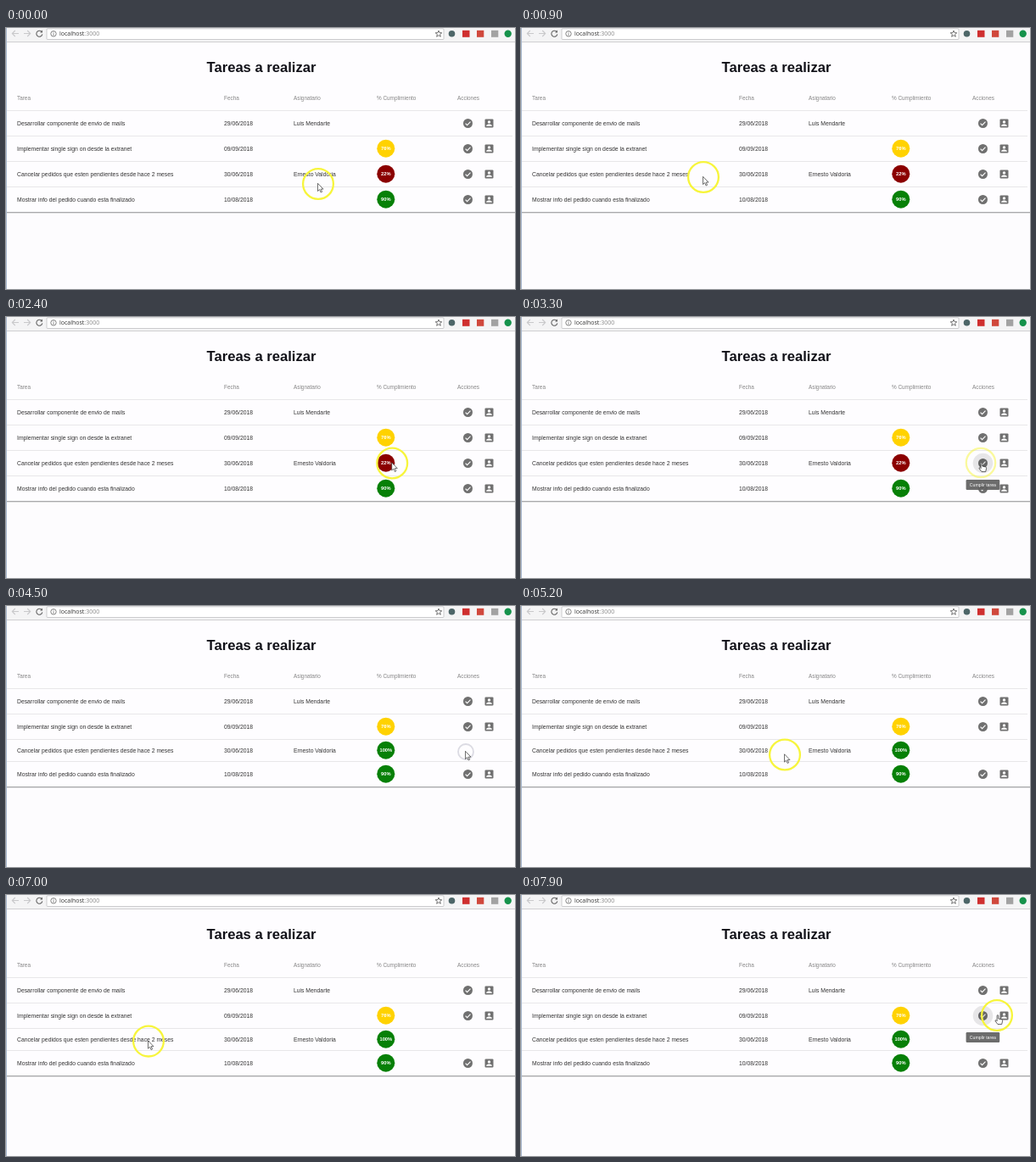
Write an HTML page that moves like this. It is 600 px wide and 308 px high and loops after 8 s.

```html
<!DOCTYPE html>
<html lang="es">
<head>
<meta charset="utf-8">
<title>Tareas a realizar</title>
<style>
  html, body { margin: 0; width: 100%; height: 100%; overflow: hidden; background: #fdfcfe; }
  svg { display: block; width: 100vw; height: 100vh; }
  text { font-family: "Liberation Sans", Arial, sans-serif; font-size: 6.8px; fill: #333; white-space: pre; }
  .title { font-size: 16.6px; font-weight: bold; fill: #111118; text-anchor: middle; }
  .head { font-size: 6.38px; fill: #868686; }
  .pct { font-size: 5.75px; font-weight: bold; fill: #fff; text-anchor: middle; }
  .url { font-family: "Open Sans", "Noto Sans", sans-serif; font-size: 7px; fill: #333; }
  .tip text { font-size: 5.2px; fill: #fff; text-anchor: middle; }
  .rule { stroke: #e8e7e9; }
</style>
</head>
<body>
<svg viewBox="0 0 600 308" preserveAspectRatio="none">
  <defs>
    <g id="check">
      <circle r="5.5" fill="#707070"/>
      <path d="M-2.9 .2L-.9 2.2L3 -1.8" fill="none" stroke="#fff" stroke-width="1.1"/>
    </g>
    <g id="person">
      <rect x="-5" y="-5" width="10" height="10" rx="1.1" fill="#707070"/>
      <circle cy="-1.6" r="1.7" fill="#fff"/>
      <path d="M-3.4 3.3v-.6C-3.4 1.6 -1.1 1 0 1S3.4 1.6 3.4 2.7v.6z" fill="#fff"/>
    </g>
  </defs>

  <rect width="600" height="308" fill="#fdfcfe"/>
  <g id="panel"></g>

  <rect width="600" height="16" fill="#f4f4f5"/>
  <path d="M0 16.5H600" stroke="#cfcfd1"/>
  <rect x="48" y=".8" width="468" height="12.7" rx="1" fill="#fff" stroke="#b8b8bb" stroke-width=".7"/>
  <g fill="none" stroke="#c9c9cb" stroke-width="1.1">
    <path d="M15 6.5H7.5M10.8 3L7.3 6.5L10.8 10"/>
    <path d="M21 6.5H28.5M25.2 3L28.7 6.5L25.2 10"/>
    <path d="M41.8 4.2A3.5 3.5 0 1 0 42.8 7.4" stroke="#666"/>
    <path d="M43 2.6V5.6H40z" fill="#666" stroke="none"/>
    <circle cx="56" cy="6.8" r="3.2" stroke="#666" stroke-width=".8"/>
    <path d="M56 6.3V8.7M56 4.7V5.5" stroke="#666" stroke-width=".8"/>
  </g>
  <text class="url" x="63" y="9.3">localhost<tspan fill="#888">:3000</tspan></text>
  <path id="star" fill="none" stroke="#555" stroke-width=".8"/>
  <circle cx="525.5" cy="6.8" r="3.8" fill="#4d6668"/>
  <rect x="538" y="2.8" width="8.5" height="8" fill="#cf2f2f"/>
  <rect x="555" y="2.8" width="8.3" height="8" fill="#d0483c"/>
  <rect x="572" y="2.8" width="8.3" height="8" fill="#a2a2a2"/>
  <circle cx="591.7" cy="6.8" r="4.2" fill="#15924b"/>
  <path d="M.5 0V308" stroke="#a9b9cf"/>

  <g id="halo"><circle r="11.8" fill="#000" fill-opacity=".09"/></g>
  <g id="tip" class="tip">
    <rect x="-19.8" y="-6" width="39.6" height="12" rx="1.2" fill="#616161" fill-opacity=".93"/>
    <text y="1.8">Cumplir tarea</text>
  </g>
  <g id="cursor">
    <circle id="ring" fill="none"/>
    <path id="arrow" d="M-.5 -.7V8.6L1.6 6.6L3.1 10L4.6 9.3L3.1 6.1H6z" fill="#fff" stroke="#333" stroke-width=".7"/>
    <path id="hand" d="M.1 .2Q.9 -1 1.8 .2V4L5.8 5Q6.8 5.4 6.6 6.6L5.7 10.6H1L-1.9 6.8Q-2 5.6 -.9 5.7L.1 6.7z" fill="#fff" stroke="#222" stroke-width=".7"/>
  </g>
</svg>

<script>
const LOOP = 8000, STEP = 100, DONE = 4300;
const $ = id => document.getElementById(id);

function add(parent, tag, attrs, text) {
  const el = document.createElementNS("http://www.w3.org/2000/svg", tag);
  for (const k in attrs) el.setAttribute(k, attrs[k]);
  if (text) el.textContent = text;
  return parent.appendChild(el);
}
const place = (el, x, y) => el.setAttribute("transform", `translate(${x} ${y})`);
const show = (el, on) => el.setAttribute("opacity", +on);

const COLS = [13, 257, 339, 437, 532];
const TITLES = ["Tarea", "Fecha", "Asignatario", "% Cumplimiento", "Acciones"];
const ROWS = [
  ["Desarrollar componente de envio de mails", "29/06/2018", "Luis Mendarte"],
  ["Implementar single sign on desde la extranet", "09/09/2018", "", "76%", "#ffd200"],
  ["Cancelar pedidos que esten pendientes desde hace 2 meses", "30/06/2018", "Ernesto Valdoria", "22%", "#8b0000"],
  ["Mostrar info del pedido cuando esta finalizado", "10/08/2018", "", "90%", "#078007"]
];

const panel = $("panel");
const sheet = add(panel, "rect", { x: 1, y: 16, width: 599, fill: "#fefdff" });
add(panel, "text", { class: "title", x: 301, y: 52.2 }, "Tareas a realizar");
TITLES.forEach((s, i) => add(panel, "text", { class: "head", x: COLS[i], y: 84.9 }, s));

const rows = ROWS.map(([task, date, who, pct, color]) => {
  const g = add(panel, "g", {});
  [task, date, who].forEach((s, i) => s && add(g, "text", { x: COLS[i], y: 2.6 }, s));
  let badge, label;
  if (pct) {
    badge = add(g, "circle", { cx: 447.8, cy: .2, r: 10.5, fill: color });
    label = add(g, "text", { class: "pct", x: 447.8, y: 2.3 }, pct);
  }
  const icons = add(g, "g", {});
  add(icons, "use", { href: "#check", x: 544.5, y: .5 });
  add(icons, "use", { href: "#person", x: 569.5, y: .5 });
  return { g, badge, label, icons };
});
const rules = [97.5, 127.5, 157.5, 0].map(y => add(panel, "path", { class: "rule", d: `M1 ${y}H597` }));
const edge = add(panel, "g", {});
add(edge, "path", { d: "M1 .5H600", stroke: "#a9a9ab" });
add(edge, "path", { d: "M1 1.5H600", stroke: "#dededf" });

const star = Array.from({ length: 10 }, (_, i) => {
  const r = i % 2 ? 1.7 : 4, a = i * Math.PI / 5;
  return `${(510 + r * Math.sin(a)).toFixed(2)} ${(7 - r * Math.cos(a)).toFixed(2)}`;
});
$("star").setAttribute("d", `M${star.join("L")}z`);

// time, x, y
const PATH = [
  [0, 368, 184], [150, 366, 184], [900, 215, 176], [1250, 165, 175], [1600, 255, 173],
  [1900, 195, 174], [2650, 542, 172], [4600, 542, 172], [5200, 311, 175.5],
  [5700, 205, 174], [6200, 236.5, 172.3], [6800, 175, 173], [7250, 158, 172],
  [7750, 538, 143], [7900, 561, 142]
];
// time, radius, strength
const RING = [
  [0, 17.9, 1], [2700, 17.9, 1], [3200, 17.2, .5], [4200, 17.2, .5],
  [4400, 9, .5], [4500, 9, .5], [4700, 17.9, 1], [LOOP, 17.9, 1]
];

function sample(keys, t) {
  const i = keys.findIndex(k => k[0] > t);
  if (i < 0) return keys[keys.length - 1].slice(1);
  const a = keys[i - 1], b = keys[i];
  const p = (t - a[0]) / (b[0] - a[0]), e = (1 - Math.cos(Math.PI * p)) / 2;
  return a.slice(1).map((v, n) => v + (b[n + 1] - v) * e);
}
const ramp = (t, from, len) => Math.max(0, Math.min(1, (t - from) / len));

function draw(t) {
  const done = t >= DONE;
  [112, 142, done ? 170 : 172, done ? 198 : 202].forEach((y, i) => place(rows[i].g, 0, y));
  rules[3].setAttribute("d", `M1 ${done ? 183.5 : 187.5}H597`);
  const bottom = done ? 213 : 217;
  sheet.setAttribute("height", bottom - 16);
  place(edge, 0, bottom);
  rows[2].badge.setAttribute("fill", done ? "#078007" : "#8b0000");
  rows[2].label.textContent = done ? "100%" : "22%";
  show(rows[2].icons, !done);

  const [x, y] = sample(PATH, t), [r, strength] = sample(RING, t);
  const clicked = t >= DONE && t <= 4500;
  place($("cursor"), x, y);
  const ring = $("ring");
  ring.setAttribute("r", r);
  ring.setAttribute("stroke", clicked ? "#b9b9c8" : "#f7f53c");
  ring.setAttribute("stroke-width", clicked ? 1.8 : 2.3);
  ring.setAttribute("opacity", strength);

  const first = t >= 2600 && t < DONE, second = t >= 7700;
  const hand = first || second, rowY = second ? 142 : 172;
  show($("hand"), hand);
  show($("arrow"), !hand);
  place($("halo"), 544.5, rowY + .5);
  show($("halo"), hand);
  place($("tip"), 544.4, rowY + 26);
  $("tip").setAttribute("opacity", first ? ramp(t, 2600, 200) : second ? ramp(t, 7700, 200) : 0);
}

const start = performance.now();
function tick() {
  const t = (performance.now() - start) % LOOP;
  draw(Math.floor(t / STEP) * STEP);
  requestAnimationFrame(tick);
}
tick();
</script>
</body>
</html>
```
